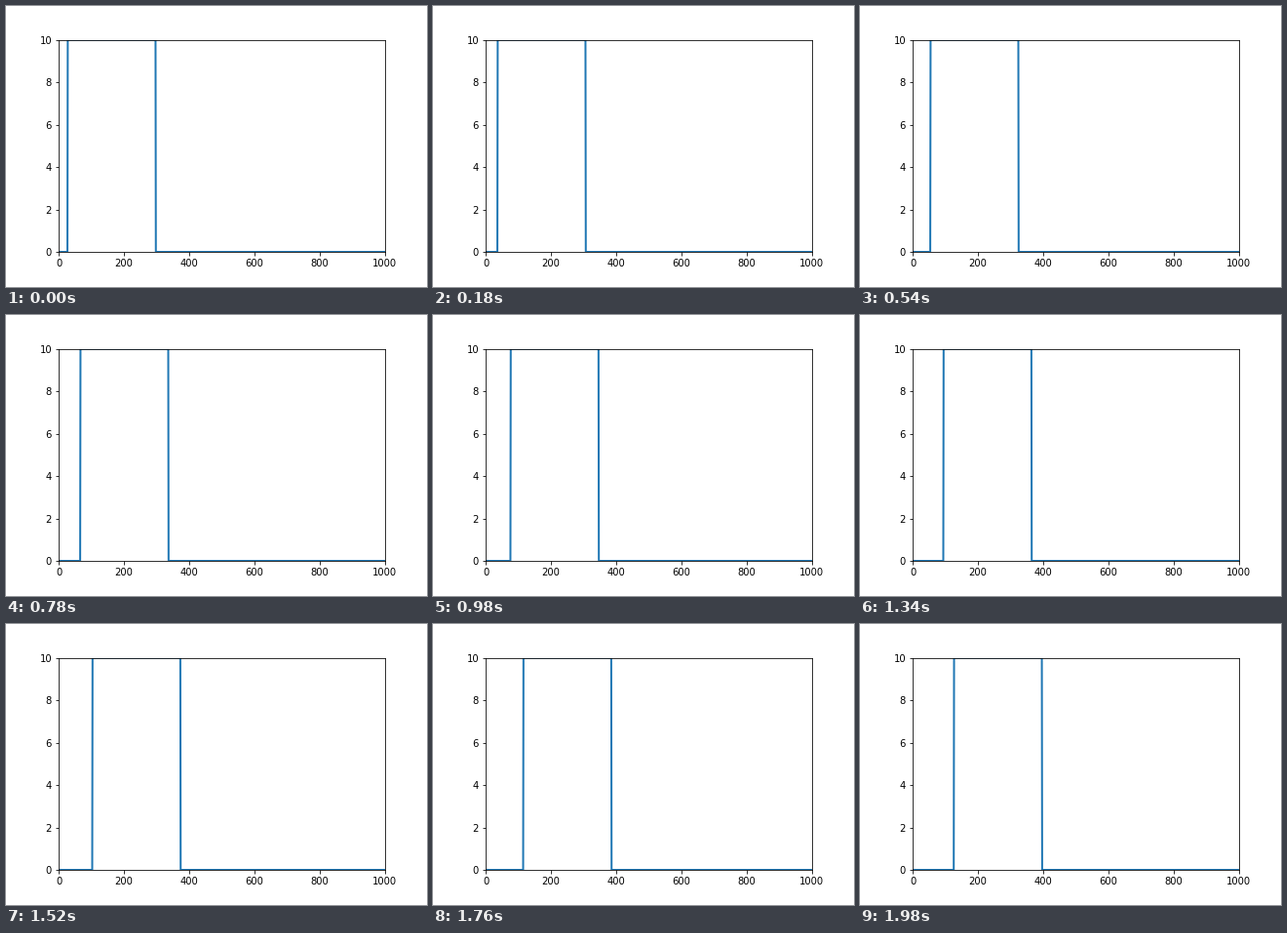
These frames come from a looping animation (432 px wide and 288 px high, 2000 ms). A matplotlib script:

```python
import matplotlib.pyplot as plt
import numpy as np
from matplotlib.animation import FuncAnimation

FRAMES = 100
START, WIDTH, HEIGHT = 28, 270, 10

fig, ax = plt.subplots(figsize=(6, 4), dpi=72)
fig.subplots_adjust(left=0.125, right=0.9, bottom=0.125, top=0.88)
ax.set_xlim(0, 1000)
ax.set_ylim(0, 10)

x = np.arange(1001)
line, = ax.plot([], [], lw=2, color="#1f77b4")


def pulse(shift):
    """Rectangular pulse moved right by `shift` samples."""
    left = START + shift
    return np.where((x >= left) & (x < left + WIDTH), HEIGHT, 0)


def update(i):
    line.set_data(x, pulse(i))
    return line,


anim = FuncAnimation(fig, update, frames=FRAMES, interval=20,
                     repeat=True, repeat_delay=0, blit=False)
plt.show()
```
